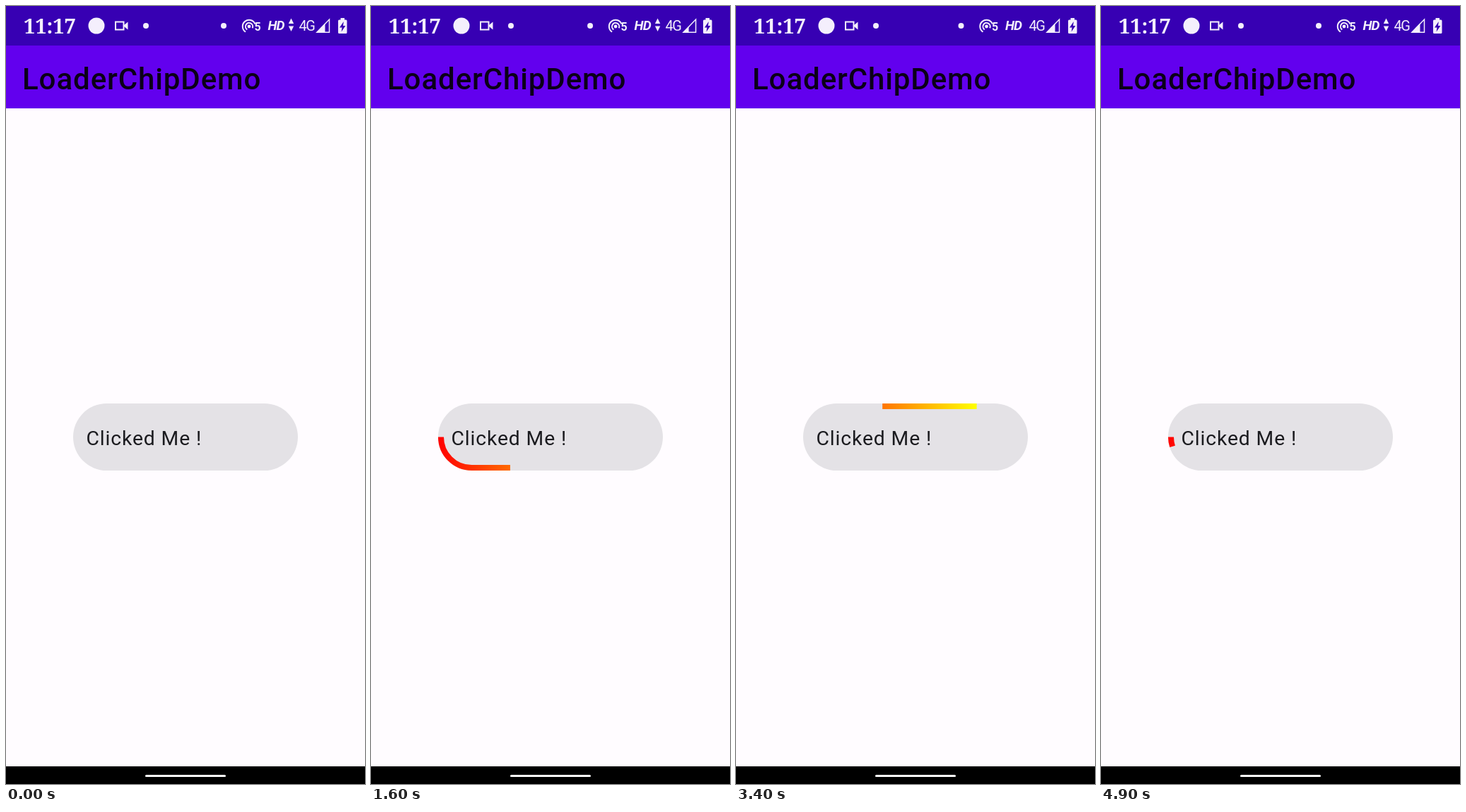
Animation of 508 by 1102 pixels, one loop 5 s. Source, as an HTML page:

```html
<!DOCTYPE html>
<html lang="en">
<head>
<meta charset="utf-8">
<title>Loader chip</title>
<style>
  html, body { margin: 0; width: 100%; height: 100%; overflow: hidden; background: #fffcff; }
  svg { display: block; width: 100%; height: 100%; }
  text { font-family: Roboto, sans-serif; }
  .clock { font: 700 29px "Noto Serif", serif; }
  .title { font-size: 42px; font-weight: 500; letter-spacing: .88px; }
  .label { font-size: 28.3px; letter-spacing: .88px; }
  .hd { font-size: 19px; font-weight: 700; font-style: italic; font-stretch: 75%; letter-spacing: -1px; }
  .net { font-size: 20px; font-stretch: 75%; letter-spacing: -1.5px; }
  .spot { font-size: 16px; font-weight: 700; }
  .line { fill: none; stroke: #f4effc; stroke-width: 2; }
</style>
</head>
<body>
<svg viewBox="0 0 508 1102">
  <defs>
    <linearGradient id="heat" gradientUnits="userSpaceOnUse" x1="95" y1="0" x2="340" y2="0">
      <stop stop-color="#f00"/>
      <stop offset="1" stop-color="#ff0"/>
    </linearGradient>
  </defs>
  <rect width="508" height="1102" fill="#fffcff"/>
  <rect width="508" height="56" fill="#3700b3"/>
  <rect y="56" width="508" height="89" fill="#6200ee"/>
  <rect y="1077" width="508" height="25"/>
  <rect x="197" y="1089" width="114" height="3" rx="1.5" fill="#fff"/>

  <g fill="#f4effc">
    <text class="clock" x="25" y="39">11:17</text>
    <circle cx="128" cy="28" r="11.5"/>
    <rect class="line" x="155" y="22.5" width="11.5" height="11"/>
    <path d="M167 27 L172.5 22.5 V33.5 L167 29Z"/>
    <circle cx="198" cy="28" r="4"/>

    <g id="left">
      <circle cx="308" cy="28" r="4"/>
      <circle cx="344" cy="29" r="2.4"/>
      <path class="line" d="M339 36.7 A9.2 9.2 0 1 1 352.5 25.5 M341.3 33.3 A5.1 5.1 0 1 1 348.6 31.3"/>
      <text class="spot" x="351.5" y="35">5</text>
      <text class="hd" x="370.5" y="34">HD</text>
      <path id="arrows" d="M399.8 25 H407.2 L403.5 17.5Z M399.8 28.5 H407.2 L403.5 36Z"/>
    </g>
    <g id="mobile">
      <text class="net" x="414.5" y="35">4G</text>
      <path class="line" style="stroke-width:1.5" d="M440 37.2 L457.5 19 V37.2Z"/>
      <path id="level"/>
    </g>

    <path d="M473.5 17 H479 V19.5 H481 Q482.5 19.5 482.5 21 V37.5 Q482.5 39 481 39 H471.5 Q470 39 470 37.5 V21 Q470 19.5 471.5 19.5 H473.5Z"/>
    <path d="M477.8 22 L472 30.5 H475.5 L474.6 36.5 L480.4 28 H477Z" fill="#3700b3"/>
  </g>

  <text class="title" x="23" y="117.5" fill="#0b0018">LoaderChipDemo</text>

  <rect x="95" y="563" width="318" height="95" rx="47.5" fill="#e4e2e6"/>
  <rect id="press" x="95" y="563" width="318" height="95" rx="47.5"/>
  <path id="loader" fill="none" stroke="url(#heat)" stroke-width="8"
    d="M99 610.5 A43.5 43.5 0 0 0 142.5 654 H365.5 A43.5 43.5 0 0 0 365.5 567 H142.5 A43.5 43.5 0 0 0 99 610.5"/>
  <text class="label" x="113.5" y="621.5" fill="#1b1b1f">Clicked Me !</text>
</svg>
<script>
  const LOOP = 5000, STEP = 100, START = 505, CYCLE = 4040;
  const SLIDE = 250, GAP = 10.5;
  // Times at which mobile data turns active or idle.
  const DATA = [[-1000, true], [500, false], [1400, true], [2500, false], [4600, true]];

  const el = id => document.getElementById(id);
  const clamp = v => Math.min(1, Math.max(0, v));
  const shift = (node, x) => node.setAttribute("transform", `translate(${x} 0)`);
  const [left, arrows, mobile, level, press, loader] =
    ["left", "arrows", "mobile", "level", "press", "loader"].map(el);
  const total = loader.getTotalLength();

  function drawStatus(t) {
    const [since, active] = DATA.filter(e => e[0] <= t).pop();
    const p = clamp((t - since) / SLIDE);
    const x = GAP * (active ? 1 - p : p);
    arrows.style.display = active ? "" : "none";
    shift(left, x);
    shift(mobile, active ? x : x - GAP);
    const edge = t >= 500 && t < 3000 ? 447.5 : 451.5;
    level.setAttribute("d", `M438.5 38 L${edge} ${38 - (edge - 438.5) * 1.04} V38Z`);
  }

  function drawLoader(t) {
    const age = t - START;
    loader.style.display = age > 0 ? "" : "none";
    if (age <= 0) return;
    const head = (1 - Math.cos(Math.PI * (age % CYCLE) / CYCLE)) / 2;
    const tail = Math.max(0, 2 * head - 1);
    loader.setAttribute("stroke-dasharray", `${(head - tail) * total} ${total * 2}`);
    loader.setAttribute("stroke-dashoffset", -tail * total);
  }

  function draw(now) {
    const t = Math.floor((now % LOOP) / STEP) * STEP;
    drawStatus(t);
    drawLoader(t);
    press.setAttribute("opacity", t < 500 ? 0 : 0.06 * clamp((1100 - t) / 600));
    requestAnimationFrame(draw);
  }

  const begin = performance.now();
  const tick = () => draw(Math.max(0, performance.now() - begin));
  draw = (base => now => base(Math.max(0, now - begin)))(draw);
  tick();
</script>
</body>
</html>
```
